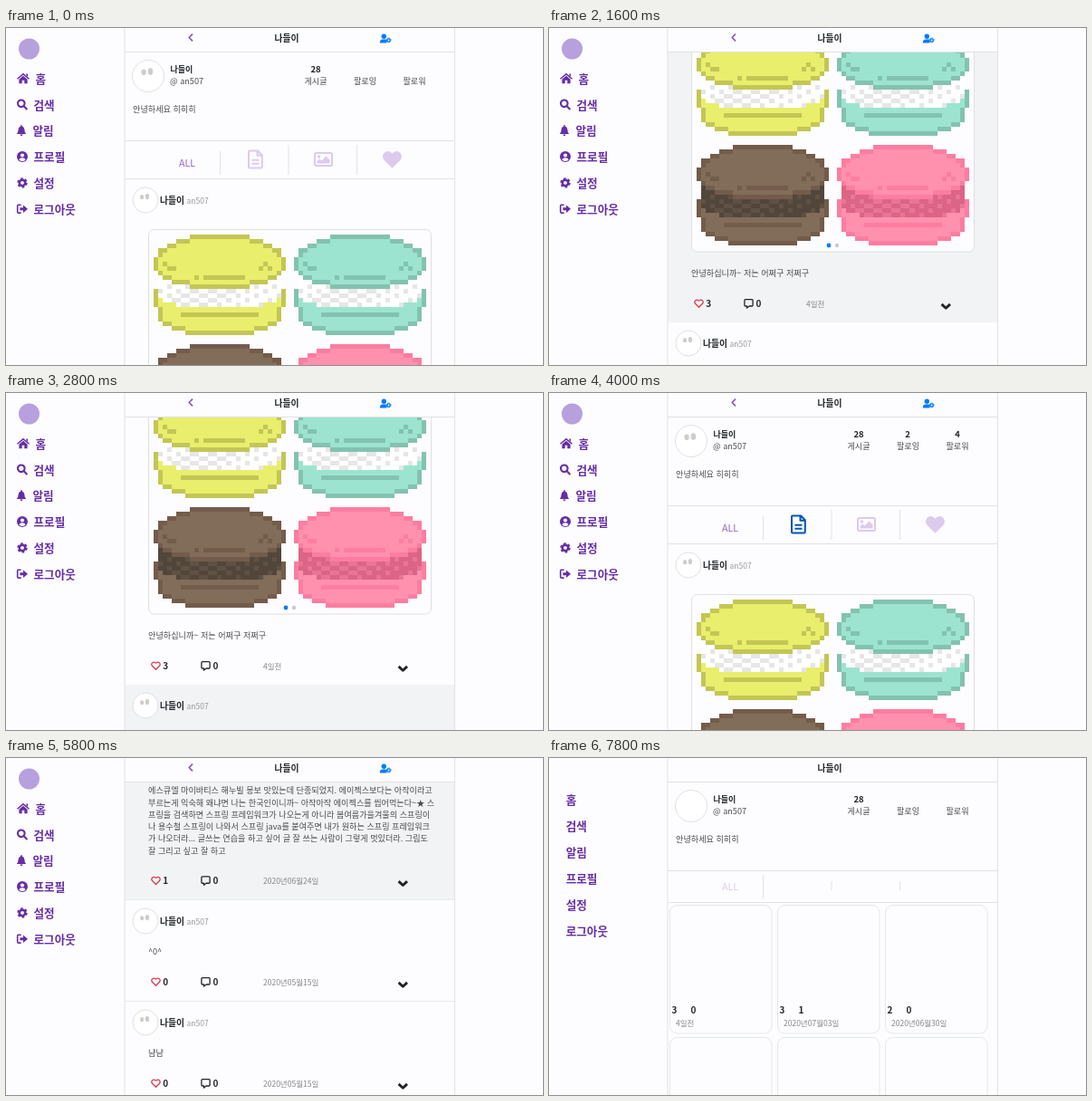
Write an HTML page that moves like this. It is 593x372 px and loops after 8000 ms.

```html
<!DOCTYPE html>
<html lang="ko">
<head>
<meta charset="utf-8">
<title>Profile page</title>
<style>
html, body { margin: 0; width: 100%; height: 100%; overflow: hidden; background: #fdfcfe; }
svg { display: block; font-family: "Noto Sans CJK KR", "Noto Sans CJK", sans-serif; }
.ic { fill: currentColor; stroke: none; }
.ln { fill: none; stroke: currentColor; stroke-linejoin: round; }
.rule { stroke: #e1e2e8; fill: none; }
.thin { stroke: #e9eaee; }
.post { fill: #fdfcfe; }
.post.hover { fill: #f1f3f4; }
.bare .ic, .bare .full, svg:not(.bare) .bareOnly { display: none; }
.bare .posts { transform: translateY(-7px); }
</style>
</head>
<body>
<svg id="stage" width="593" height="372" viewBox="0 0 593 372"></svg>
<script>
const stage = document.getElementById('stage');
const NAME = '나들이', USER = 'an507';
const PURPLE = '#652da6', SOFT = '#9564c6', PALE = '#dccbed', BLUE = '#0056b3', INK = '#212529';

// y is the vertical middle of the glyphs
const text = (x, y, s, size = 9.12, fill = '#4a4a4f', weight = 400, anchor = 'start', extra = '') =>
  `<text x="${x}" y="${(y + size * .37).toFixed(2)}" font-size="${size}" fill="${fill}" font-weight="${weight}" text-anchor="${anchor}" ${extra}>${s}</text>`;
const line = (d, kind = '') => `<path class="rule ${kind}" d="${d}"/>`;
const HEART = 'M0 4.5L-4.2 .3C-6.4-2.3-2.6-6.2 0-2.9C2.6-6.2 6.4-2.3 4.2.3z';

const icons = {
  home: '<path d="M-7 0L0-6L7 0L6 1L0-4L-6 1zM-4.6 1L0-2.9L4.6 1V5.5H1.3V2H-1.3V5.5H-4.6zM3.4-5.2h1.7v3.2l-1.7-1.4z"/>',
  search: '<g class="ln" stroke-width="2.1"><circle cx="-1.2" cy="-1.2" r="3.8"/><path d="M1.8 1.8L5.4 5.4"/></g>',
  bell: '<path d="M-5.2 3.6Q-3.4 2-3.4-1Q-3.2-4-.8-4.7V-6H.8V-4.7Q3.2-4 3.4-1Q3.4 2 5.2 3.6zM-1.6 4.3H1.6Q1.2 6 0 6Q-1.2 6-1.6 4.3z"/>',
  user: '<circle r="6"/><g fill="#fdfcfe"><circle cy="-1.6" r="2.1"/><path d="M-3.7 3.4Q-3 1.2 0 1.2Q3 1.2 3.7 3.4Q0 6.4-3.7 3.4z"/></g>',
  cog: '<g class="ln"><circle r="3.2" stroke-width="2.6"/><circle r="4.7" stroke-width="2" stroke-dasharray="2.6 2.32"/></g>',
  exit: '<path class="ln" stroke-width="1.6" d="M-1.4-4.4H-4.4Q-5.3-4.4-5.3-3.4V3.4Q-5.3 4.4-4.4 4.4H-1.4"/><path d="M-2.6-1.5H1V-4.2L6 0L1 4.2V1.5H-2.6z"/>',
  back: '<path class="ln" stroke-width="1.7" d="M2-3.8L-1.8 0L2 3.8"/>',
  userCog: '<circle cx="-1.7" cy="-2.3" r="2.7"/><path d="M-6.2 5Q-6.2 1-2.8 1H-.2Q1.2 1 1.6 2L1.4 5z"/><g class="ln" transform="translate(3.6 2)"><circle r="1.6" stroke-width="1.4"/><circle r="2.5" stroke-width="1" stroke-dasharray="1.1 .86"/></g>',
  doc: '<g class="ln" stroke-width="2"><path d="M-6.6-9.5H2.6L7.3-4.8V8.3Q7.3 9.5 6.1 9.5H-6.4Q-7.5 9.5-7.5 8.3V-8.4Q-7.5-9.5-6.6-9.5zM2-9V-4.2H7M-4 .8H4M-4 4.8H4"/></g>',
  image: '<rect class="ln" stroke-width="2" x="-9.5" y="-7" width="19" height="14" rx="1.5"/><circle cx="-5" cy="-3" r="1.7"/><path d="M-7 4.6V2.2L-4.2-.4L-2 1.5L3-3.5L7 .5V4.6z"/>',
  love: `<path transform="scale(2.15)" d="${HEART}"/>`,
  like: `<path class="ln" stroke-width="1.25" transform="scale(.95)" d="${HEART}"/>`,
  comment: '<path class="ln" stroke-width="1.3" d="M-3.6-4.4H3.6Q4.6-4.4 4.6-3.4V2Q4.6 3 3.6 3H.6L-2 5V3H-3.6Q-4.6 3-4.6 2V-3.4Q-4.6-4.4-3.6-4.4z"/>',
  down: '<path class="ln" stroke-width="2.9" d="M-4.7-2.3L0 2.1L4.7-2.3"/>'
};
const icon = (name, x, y, color, id = '') =>
  `<g class="ic" ${id && `id="${id}"`} transform="translate(${x} ${y})" style="color:${color}">${icons[name]}</g>`;

const avatar = (x, y, r) =>
  `<circle cx="${x}" cy="${y}" r="${r}" fill="#fff" stroke="#e0e0e6"/>` +
  `<g class="ic" style="color:#d0cccc"><ellipse cx="${x - r * .28}" cy="${y - r * .24}" rx="${r * .15}" ry="${r * .19}"/><ellipse cx="${x + r * .14}" cy="${y - r * .28}" rx="${r * .16}" ry="${r * .22}"/></g>`;

// Pixel macaron, 29 x 22 cells, mirrored left to right
const topEdge = [8, 5, 3, 1, 1, 0, 0, 0, 1, 2, 4, 8];
const lowEdge = [0, 0, 0, 0, 1, 1, 1, 2, 4, 7];
const creamEdge = [1, 1, 1, 1, 1, 2, 5];

function cellKind(c, r) {
  const m = Math.min(c, 28 - c);
  const rim = (edge, i) => m < Math.max(edge[i] + 1, edge[i - 1] || 0, edge[i + 1] || 0);
  if (r < 12 && m >= topEdge[r]) {
    if (r === 0 || r === 11 || rim(topEdge, r)) return 'dark';
    const mark = r === 6 && (c === 2 || c === 24) ||
      r === 7 && (c === 3 || c === 4 || c === 23 || c === 25) ||
      r === 9 && (c === 9 || c > 10 && c < 20);
    return mark ? 'dark' : 'light';
  }
  if (r > 8 && r < 16 && m >= creamEdge[r - 9])
    return (c + 2 * r) % 4 < 2 && (c * 5 + r * 3) % 7 > 1 ? 'check' : 'cream';
  if (r > 11 && m >= lowEdge[r - 12]) {
    if (r === 21 || rim(lowEdge, r - 12) || r === 17 && m > 5) return 'dark';
    return 'light';
  }
}
const cells = { light: '', dark: '', cream: '', check: '' };
for (let r = 0; r < 22; r++)
  for (let c = 0; c < 29; c++) {
    const kind = cellKind(c, r);
    if (kind) cells[kind] += `M${c} ${r}h1v1h-1z`;
  }
const macaron = (x, y, ...colors) =>
  `<g transform="translate(${x} ${y}) scale(5.03)" shape-rendering="crispEdges">` +
  Object.values(cells).map((d, i) => `<path d="${d}" fill="${colors[i]}"/>`).join('') + '</g>';

const photoCard =
  '<rect x="157.5" y="222.5" width="312" height="244.5" rx="6" fill="#fdfcfe" stroke="#dee0e6"/>' +
  macaron(163, 228, '#e9ee6c', '#c3c655', '#fff', '#e6e6e6') +
  macaron(318, 228, '#9ce4cf', '#83c2b0', '#fff', '#e6e6e6') +
  macaron(163, 349, '#826c5a', '#735c4b', '#52463b', '#5f5143') +
  macaron(318, 349, '#ff91af', '#fc7da1', '#dc6486', '#e87596') +
  '<circle cx="309" cy="460" r="2.4" fill="#007bff"/><circle cx="318" cy="460" r="2.2" fill="#c9c9ce"/>';

// a: middle of the avatar, body: text lines, photo: adds the picture card
function post(a, body, likes, date, photo) {
  const first = photo ? 491 : a + 34, act = first + (body.length - 1) * 13.25 + 33;
  return `<rect class="post" x="131" y="${a - 23}" width="364" height="${act - a + 45}"/>` +
    line(`M131 ${Math.round(act) + 21.5}H495`, 'thin') + avatar(154, a, 14) +
    text(170, a + .5, NAME, 9.8, INK, 700) + text(199.5, a + .5, USER, 8.5, '#98989d') +
    (photo ? photoCard : '') +
    body.map((s, i) => text(157, first + i * 13.25, s)).join('') +
    icon('like', 165.5, act, '#dc3545') + text(173.3, act, likes, 10, INK, 700) +
    icon('comment', 220.5, act, INK) + text(228.5, act, 0, 10, INK, 700) +
    text(284, act + .5, date, 8.5, '#85858a') + icon('down', 438.3, act + 3.2, INK);
}
const oops = ['아이구~'], yum = ['음~ 맛있다~ 마트 다녀오셨나봐요^^'];
const essay = [
  '에스큐엘 마이바티스 해누빌 몽보 맛있는데 단종되었지. 에이젝스보다는 아작이라고',
  '부르는게 익숙해 왜냐면 나는 한국인이니까~ 아작아작 에이젝스를 씹어먹는다~★ 스',
  '프링을 검색하면 스프링 프레임워크가 나오는게 아니라 봄여름가을겨울의 스프링이',
  '나 용수철 스프링이 나와서 스프링 java를 붙여주면 내가 원하는 스프링 프레임워크',
  '가 나오더라... 글쓰는 연습을 하고 싶어 글 잘 쓰는 사람이 그렇게 멋있더라. 그림도',
  '잘 그리고 싶고 잘 하고'
];

const allPosts =
  post(190, ['안녕하십니까~ 저는 어쩌구 저쩌구'], 3, '4일전', true) +
  post(568, oops, 0, '2020년07월17일') + post(680, yum, 3, '2020년07월11일') +
  post(792, ['냠냠'], 3, '2020년07월03일');
const textPosts =
  post(190, oops, 0, '2020년07월17일') + post(302, yum, 3, '2020년07월11일') +
  post(414, essay, 1, '2020년06월24일') + post(592, ['^0^'], 0, '2020년05월15일') +
  post(704, ['냠냠'], 0, '2020년05월15일');

const card = (x, y, likes, notes, date) =>
  `<rect x="${x + .5}" y="${y + .5}" width="112.5" height="141.5" rx="8" fill="none" stroke="#e4e8ea"/>` +
  text(x + 2.5, y + 116, likes, 10, INK, 700) + text(x + 23.5, y + 116, notes, 10, INK, 700) +
  text(x + 7, y + 131, date, 8.5, '#85858a');
const grid =
  card(133, 162, 3, 0, '4일전') + card(252, 162, 3, 1, '2020년07월03일') +
  card(371, 162, 2, 0, '2020년06월30일') +
  [133, 252, 371].map(x => card(x, 308, 0, 0, '2020년05월15일')).join('');

const stat = (x, n) => text(x, 45.5, n, 9.5, INK, 700, 'middle');
const profile =
  avatar(157, 53, 17.5) + text(181.5, 45.5, NAME, 9, INK, 700) + text(181, 59, '@ ' + USER) +
  stat(342, 28) + `<g id="counts">${stat(396, 2)}${stat(451, 4)}</g>` +
  ['게시글', '팔로잉', '팔로워'].map((s, i) => text(342 + i * 54.5, 59, s, 9.12, '#4a4a4f', 400, 'middle')).join('') +
  text(140, 90, '안녕하세요 히히히') + line('M131 124.5H495');

const tabs =
  `<g class="full">${text(200, 149, 'ALL', 10.7, SOFT, 400, 'middle', 'data-all')}` +
  line('M236.5 136V162M312 129V162M387.5 129V162M131 166.5H495') + '</g>' +
  `<g class="bareOnly">${text(200, 142, 'ALL', 10.7, PALE, 400, 'middle')}` +
  line('M236.5 129V155M312 136V146M387.5 136V146M131 159.5H495') + '</g>' +
  icon('doc', 275.5, 145, PALE, 'doc') + icon('image', 350.5, 145, PALE, 'image') + icon('love', 426.5, 145, PALE);

const menu = [
  ['home', 19, 32.5, '홈'], ['search', 18, 30.5, '검색'], ['bell', 17, 29.5, '알림'],
  ['user', 18, 30.5, '프로필'], ['cog', 18, 30.5, '설정'], ['exit', 18, 30.5, '로그아웃']
].map(([name, ix, tx, s], i) =>
  icon(name, ix, 55.7 + i * 28.8, PURPLE) +
  `<g class="full">${text(tx, 56.2 + i * 28.8, s, 12.6, PURPLE, 700)}</g>` +
  `<g class="bareOnly">${text(18.7, 46.6 + i * 28.9, s, 12.6, PURPLE, 700)}</g>`).join('');

stage.innerHTML =
  '<rect width="593" height="372" fill="#fdfcfe"/>' +
  '<circle class="ic" cx="25.5" cy="23" r="11.5" style="color:#b7a0de"/>' + menu +
  `<g id="page"><g class="posts"><g id="all">${allPosts}</g><g id="text">${textPosts}</g></g><g id="media">${grid}</g>${profile}${tabs}</g>` +
  '<rect x="131" width="364" height="27" fill="#fdfcfe"/>' + line('M131 26.5H495M131 0V372M495.5 0V372') +
  icon('back', 204, 10.5, '#8b55c2') + text(310, 11.7, NAME, 9.8, INK, 700, 'middle') + icon('userCog', 419, 11.5, '#007bff');

const $ = id => document.getElementById(id);
const allTab = stage.querySelector('[data-all]');
const rows = { all: [...$('all').querySelectorAll('.post')], text: [...$('text').querySelectorAll('.post')] };

const scrollKeys = [
  [1300, 0], [1400, 30], [1600, 220], [1800, 400], [1900, 440], [2100, 440], [2200, 436], [2500, 400], [2800, 223], [3000, 0],
  [5000, 0], [5100, 8], [5200, 50], [5600, 330], [5800, 412], [5900, 418], [6000, 350], [6200, 70], [6300, 0]
];
function scrollAt(t) {
  const i = scrollKeys.findIndex(k => k[0] >= t);
  if (i < 1) return 0;
  const [t0, y0] = scrollKeys[i - 1], [t1, y1] = scrollKeys[i];
  return Math.round(y0 + (y1 - y0) * (t - t0) / (t1 - t0));
}
const within = (t, from, to) => t >= from && t < to;
const show = (el, on) => { el.style.display = on ? '' : 'none'; };

function hoveredPost(t) {
  if (within(t, 1500, 2000)) return 0;
  if (within(t, 2000, 3100)) return 1;
  if (within(t, 5000, 5600) || within(t, 6400, 6500)) return 0;
  return within(t, 5600, 6400) ? 2 : -1;
}

function draw(t) {
  const view = t < 4100 ? 'all' : t < 7800 ? 'text' : 'media';
  stage.classList.toggle('bare', within(t, 4100, 4300) || t >= 7800);
  for (const id of ['all', 'text', 'media']) show($(id), id === view);
  show($('counts'), within(t, 100, 4100) || within(t, 4600, 7800));
  $('page').setAttribute('transform', `translate(0 ${-scrollAt(t)})`);

  const hot = hoveredPost(t);
  for (const id in rows) rows[id].forEach((el, i) => el.classList.toggle('hover', i === hot));

  allTab.setAttribute('fill', view === 'all' ? SOFT : PALE);
  const docHot = within(t, 1200, 1500) || within(t, 3200, 4100);
  const docWarm = within(t, 1100, 1200) || within(t, 3100, 3200);
  $('doc').style.color = view === 'text' ? SOFT : docHot ? BLUE : docWarm ? '#6e90d0' : PALE;
  $('image').style.color = t >= 6600 ? BLUE : t >= 6500 ? '#6e90d0' : PALE;
}

const start = performance.now();
function tick() {
  const t = (performance.now() - start) % 8000;
  draw(Math.floor((t + 5) / 100) * 100);
  requestAnimationFrame(tick);
}
tick();
</script>
</body>
</html>
```
